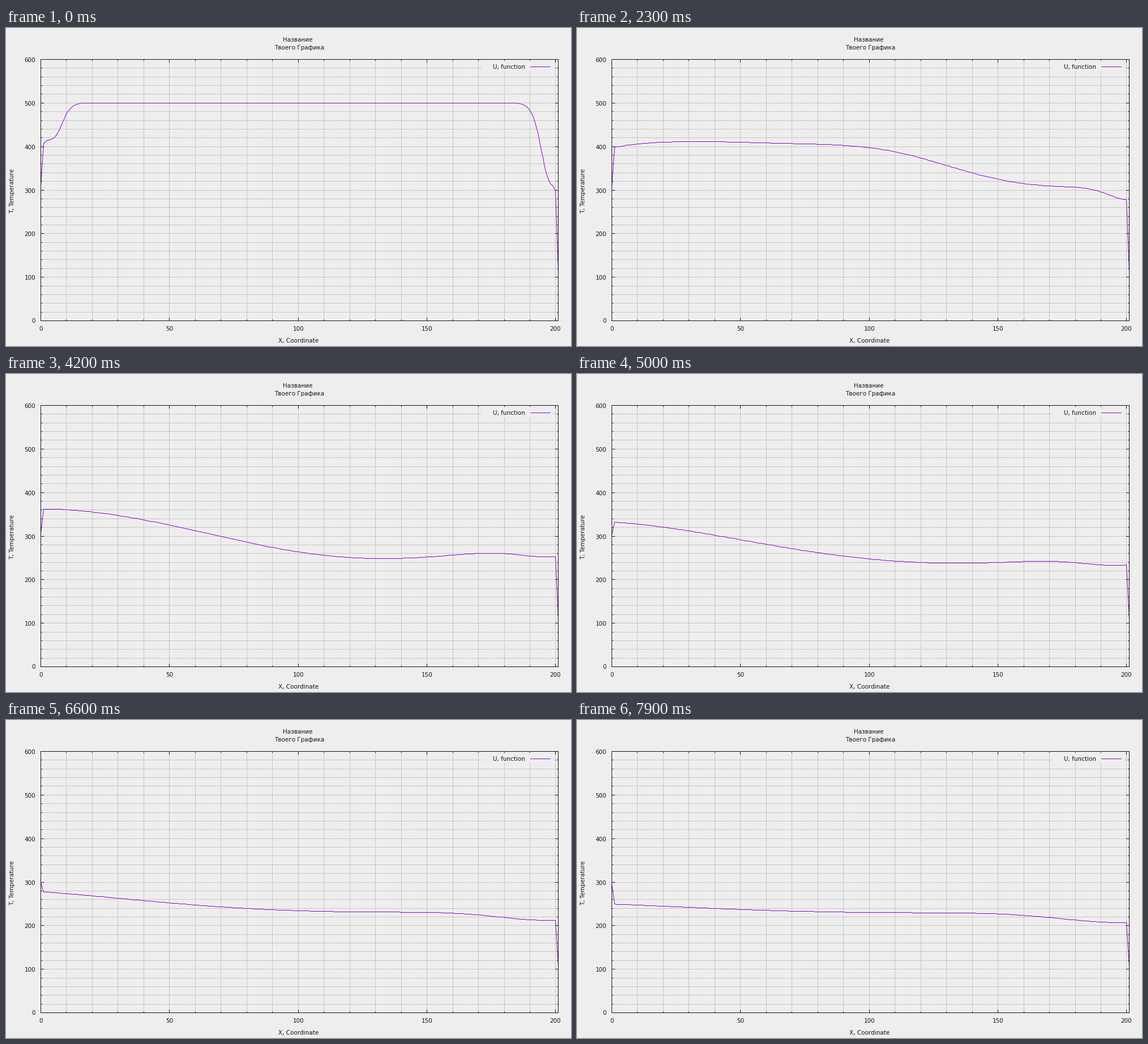
Write a matplotlib script that moves like this. It is 998x561 px and loops after 8 s.

```python
import numpy as np
import matplotlib.pyplot as plt
from matplotlib.animation import FuncAnimation
from matplotlib.collections import LineCollection

W, H, DPI = 998, 561, 64
PX = 72 / DPI                                  # points per pixel
LEFT, RIGHT, TOP, BOTTOM = 61, 975, 55, 516
XMAX, YMAX = 201, 600
FRAMES, STEP = 80, 100
HOT = 500                                      # initial temperature
INK, DOTS, PURPLE = "#141414", "#a0a0a0", "#9400d3"

plt.rcParams.update({"font.family": "DejaVu Sans", "path.snap": False,
                     "path.simplify": False})


def px(x):
    """Pixel centre of a coordinate."""
    return np.floor(LEFT + np.asarray(x) * (RIGHT - LEFT) / XMAX + 0.5) + 0.5


def py(y):
    """Pixel centre of a temperature."""
    return np.floor(BOTTOM - np.asarray(y) * (BOTTOM - TOP) / YMAX + 0.5) + 0.5


def front(q, a, b, c):
    """Falls smoothly from 1 to 0 with distance q."""
    return 1 - np.exp(-np.exp(a - b * q - c * q * q))


def left_loss(q):
    return 84 * front(q, 2.44, 0.025, 0.0004) + 19 * np.exp(-q / 8)


def right_loss(q):
    return 193 * front(q, 2.06, 0.038, 0.0003) + 29 * np.exp(-(q / 6.2) ** 2)


INNER = np.arange(1, XMAX)


def temperature(t):
    """Two cooling waves that widen linearly with time, superposed."""
    s = (t + 2.1) / 14.1
    drift = 9 * np.sqrt(max(t - 23, 0) / 56) * INNER / XMAX
    u = HOT - left_loss(INNER / s) - right_loss((XMAX - INNER) / s) + drift
    first = 300 + 0.09 * (u[0] - 300)
    last = 100 + 0.08 * (u[-1] - 100)
    return np.concatenate([[first], u, [last]])


fig = plt.figure(figsize=(W / DPI, H / DPI), dpi=DPI, facecolor="#eeeeee")
ax = fig.add_axes([0, 0, 1, 1])
ax.set(xlim=(0, W), ylim=(H, 0))
ax.axis("off")


def strokes(segs, color, z, style="solid"):
    ax.add_collection(LineCollection(segs, colors=color, linewidths=PX,
                                     linestyles=style, zorder=z), autolim=False)


def label(x, y, s, ha="center", **kw):
    ax.text(x, y, s, ha=ha, va="baseline", size=10.35 * PX, color=INK, zorder=5, **kw)


# Dotted grid, left open around the key.
KEY_L, KEY_R, KEY_T, KEY_B = 840, 968, 57, 76
grid, ticks = [], []
for x in range(0, XMAX, 10):
    c = px(x)
    top = KEY_B if KEY_L < c < KEY_R else TOP
    if x:
        grid.append([(c, BOTTOM), (c, top)])
    n = 6 if x % 50 == 0 else 3
    ticks += [[(c, BOTTOM + 1), (c, BOTTOM + 1 - n)], [(c, TOP), (c, TOP + n)]]
    if x % 50 == 0:
        label(c, 534.5, str(x))
for y in range(0, YMAX + 1, 20):
    c = py(y)
    if 0 < y < YMAX:
        if KEY_T < c < KEY_B:
            grid += [[(LEFT, c), (KEY_L, c)], [(KEY_R, c), (RIGHT, c)]]
        else:
            grid.append([(LEFT, c), (RIGHT, c)])
    n = 6 if y % 100 == 0 else 3
    ticks += [[(LEFT, c), (LEFT + n, c)], [(RIGHT + 1, c), (RIGHT + 1 - n, c)]]
    if y % 100 == 0:
        label(52, c + 4, str(y), "right")
strokes(grid, DOTS, 1, (0, (1.5, 1.5)))

l, r, t, b = LEFT + 0.5, RIGHT + 0.5, TOP + 0.5, BOTTOM + 0.5
border = [[(LEFT, t), (RIGHT + 1, t)], [(LEFT, b), (RIGHT + 1, b)],
          [(l, TOP), (l, BOTTOM + 1)], [(r, TOP), (r, BOTTOM + 1)]]
strokes(ticks + border, INK, 4)

label(515, 24, "Название")
label(518, 38, "Твоего Графика")
label(516.5, 554.5, "X, Coordinate")
label(14, 287.5, "T, Temperature", rotation=90, rotation_mode="anchor")
label(917.5, 72, "U, function", "right")
strokes([[(926, 68.5), (962, 68.5)]], PURPLE, 3)

XS = px(np.arange(XMAX + 1))
curve, = ax.plot([], [], color=PURPLE, lw=PX, zorder=3)


def update(i):
    curve.set_data(XS, py(temperature(i)))
    return curve,


anim = FuncAnimation(fig, update, frames=FRAMES, interval=STEP,
                     init_func=lambda: update(0), repeat=True, repeat_delay=0)
plt.show()
```
